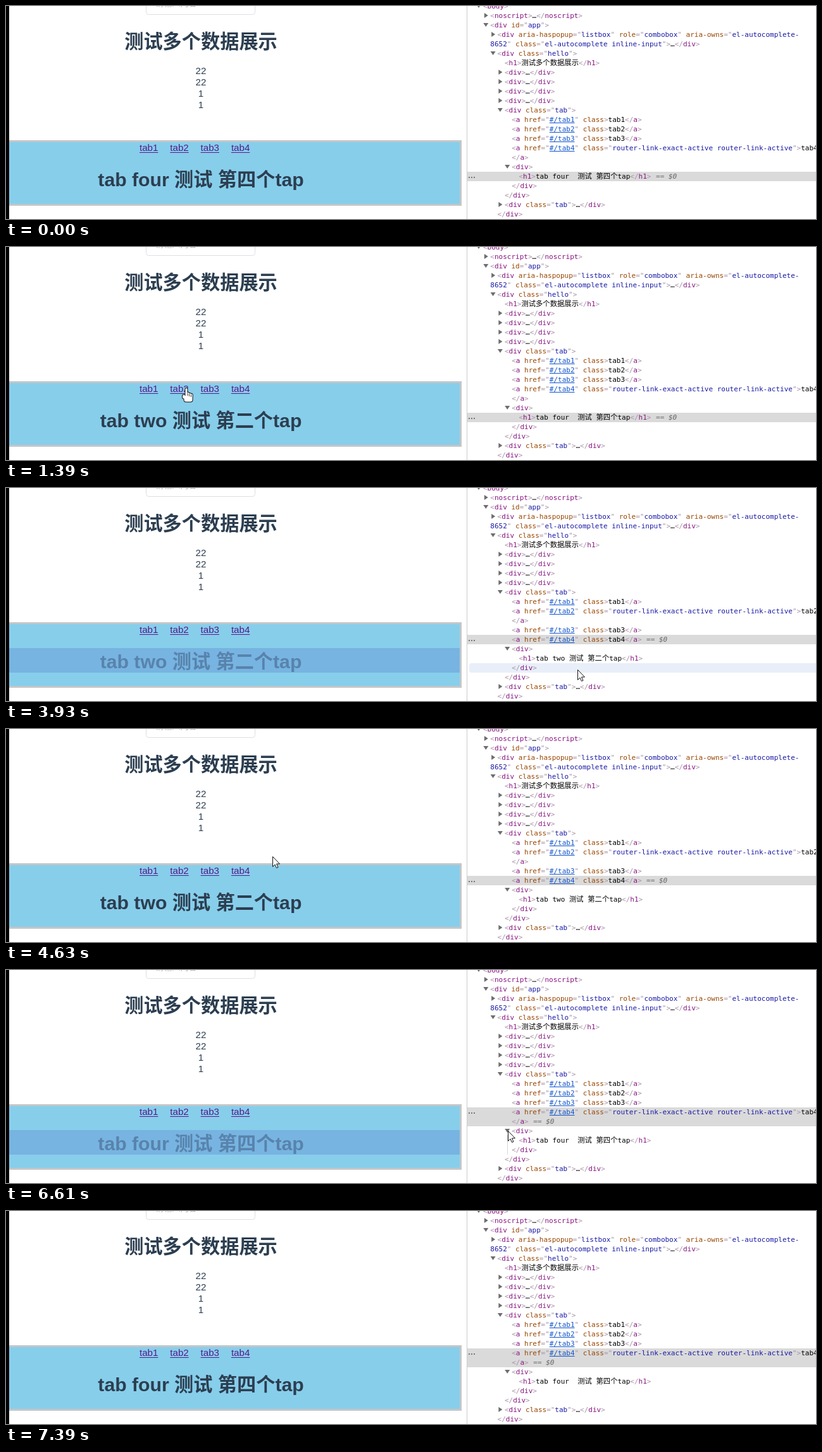
An HTML page with a canvas that plays this animation: 1280 by 338 pixels, repeating every 7.95 s.

```html
<!DOCTYPE html>
<html lang="zh-CN">
<head>
<meta charset="utf-8">
<title>Tab routing demo</title>
<style>
html, body { margin: 0; width: 100%; height: 100%; overflow: hidden; background: #fff; }
canvas { display: block; }
</style>
</head>
<body>
<canvas id="stage" width="1280" height="338"></canvas>
<script>
const ctx = document.getElementById('stage').getContext('2d');
const LOOP = 7950, PANEL = 728, ROW = 15;
const PAGE_TWO = 1390, DOM_TWO = 1460, OPEN_TWO = 3010;
const PAGE_FOUR = 5010, DOM_FOUR = 5040, OPEN_FOUR = 6550;
const POP_IN = 5380, POP_OUT = 5850, FLASH = 950;
const ENTER = 70, LEAVE = 7390;
const SANS = '"Liberation Sans", "Noto Sans CJK SC", sans-serif';
const CJK = '"Noto Sans CJK SC", "Noto Sans CJK", sans-serif';
const MONO = '11px "DejaVu Sans Mono", monospace';
const BODY = '15.1px ' + SANS, TITLE = 'bold 30.2px ' + SANS;
const INK = '#2c3e50', VISITED = '#551a8b', BLUE = 'rgba(111,168,220,.66)', ORANGE = 'rgba(246,178,107,.66)';
const COLORS = {
  punct: [168, 148, 166], name: [136, 18, 128], attr: [153, 69, 0],
  val: [26, 26, 166], link: [17, 85, 204], text: [0, 0, 0], comment: [0, 116, 0]
};

// The pointer rests between eased moves; lift bends a move upwards
const HOME = { x: 812, y: 338 };
const MOVES = [
  { from: ENTER, to: 840, x: 242, y: 233 },
  { from: 910, to: 1220, x: 285, y: 224 },
  { from: 1770, to: 2640, x: 797, y: 252 },
  { from: 3400, to: 3930, x: 903, y: 288 },
  { from: 4000, to: 4780, x: 370, y: 229, lift: 110 },
  { from: 5640, to: 6320, x: 793, y: 255 },
  { from: 7010, to: LEAVE, ...HOME }
];

const clamp = v => Math.max(0, Math.min(1, v));
const smooth = k => k * k * (3 - 2 * k);
const rgb = c => `rgb(${c.map(Math.round).join()})`;
const mix = (a, b, k) => a.map((v, i) => v + (b[i] - v) * k);

function rect(x, y, w, h, color) {
  ctx.fillStyle = color;
  ctx.fillRect(x, y, w, h);
}

function text(s, x, y, font, color, align = 'left') {
  ctx.font = font;
  ctx.fillStyle = color;
  ctx.textAlign = align;
  ctx.fillText(s, x, y);
  return ctx.measureText(s).width;
}

function poly(points, fill, stroke) {
  ctx.beginPath();
  points.forEach(([x, y]) => ctx.lineTo(x, y));
  ctx.closePath();
  if (fill) { ctx.fillStyle = fill; ctx.fill(); }
  if (stroke) { ctx.strokeStyle = stroke; ctx.stroke(); }
}

function pointer(t) {
  if (t < ENTER || t >= LEAVE) return null;
  let { x, y } = HOME;
  for (const m of MOVES) {
    const k = smooth(clamp((t - m.from) / (m.to - m.from)));
    x += (m.x - x) * k;
    y += (m.y - y) * k - (m.lift || 0) * Math.sin(Math.PI * k);
  }
  return { x, y };
}

const linkX = i => 211 + 48.3 * i;

const FOUR = { active: 4, last: 2, title: 'tab four  测试 第四个tap' };
const TWO = { active: 2, last: 4, title: 'tab two 测试 第二个tap' };

function domState(t) {
  if (t < DOM_TWO) return { ...FOUR, open: true, sel: 'inner-h1', since: -LOOP };
  if (t < DOM_FOUR) return { ...TWO, open: t >= OPEN_TWO, sel: 'a4', since: DOM_TWO };
  return { ...FOUR, open: t >= OPEN_FOUR, sel: 'a4', since: DOM_FOUR };
}

// Lines of the element tree; arrow is 'v' for open and '>' for closed
function domLines(s) {
  const lines = [];
  const add = (depth, code, node, arrow, flash, mode) =>
    lines.push({ x: 754 + 11.3 * depth, code, node, arrow, flash, mode });
  add(0, '<body>', '', 'v');
  add(1, '<noscript>…</noscript>', '', '>');
  add(1, '<div id="app">', '', 'v');
  add(2, '<div aria-haspopup="listbox" role="combobox" aria-owns="el-autocomplete-', '', '>');
  add(1, '8652" class="el-autocomplete inline-input">…</div>', '', '', '', 'val');
  add(2, '<div class="hello">', 'hello', 'v');
  add(3, '<h1>测试多个数据展示</h1>', 'h1');
  for (let i = 0; i < 4; i++) add(3, '<div>…</div>', 'data' + i, '>');
  add(3, '<div class="tab">', 'tab', 'v', 'name');
  for (let i = 1; i <= 4; i++) {
    const head = `<a href="#/tab${i}" class`, node = 'a' + i;
    if (i === s.active) {
      add(4, `${head}="router-link-exact-active router-link-active">tab${i}`, node, '', 'val');
      add(4, '</a>', node);
    } else {
      add(4, `${head}>tab${i}</a>`, node, '', i === s.last ? 'attr' : '');
    }
  }
  if (s.open) {
    add(4, '<div>', 'inner', 'v');
    add(5, `<h1>${s.title}</h1>`, 'inner-h1');
    add(4, '</div>', 'inner');
  } else {
    add(4, '<div>…</div>', 'inner', '>', 'name');
  }
  add(3, '</div>', 'tab');
  add(3, '<div class="tab">…</div>', 'next', '>');
  add(2, '</div>', 'hello');
  add(1, '</div>', '');
  add(1, '<!-- built files will be auto injected -->', '');
  return lines;
}

function tokens(code, mode = 'text') {
  const out = [];
  for (const [s] of code.matchAll(/<!--.*|<\/?|>|="|"|[\w#\/-]+|\s+|[^\w\s<>="]+/g)) {
    let kind = mode;
    if (s.startsWith('<!')) kind = 'comment';
    else if (s[0] === '<') { kind = 'punct'; mode = 'name'; }
    else if (s === '>') { kind = 'punct'; mode = 'text'; }
    else if (s === '="') { kind = 'punct'; mode = 'val'; }
    else if (s === '"') { kind = 'punct'; mode = 'attr'; }
    else if (mode === 'name') mode = 'attr';
    else if (mode === 'val' && s[0] === '#') kind = 'link';
    out.push({ s, kind });
  }
  return out;
}

function flashes(rule, tok, i) {
  if (rule === 'name') return i === 1;
  if (rule === 'attr') return tok.s === 'class';
  return rule === 'val' && tok.kind === 'val';
}

function drawLine(line, y, fade) {
  let x = line.x;
  tokens(line.code, line.mode).forEach((tok, i) => {
    const font = /[\u4e00-\u9fff]/.test(tok.s) ? '11.34px ' + CJK : MONO;
    let color = COLORS[tok.kind];
    ctx.font = font;
    const w = ctx.measureText(tok.s).width;
    if (fade < 1 && flashes(line.flash, tok, i)) {
      const ease = 1 - (1 - clamp(fade / 0.8)) ** 1.6;
      ctx.globalAlpha = clamp((1 - fade) * 5);
      rect(x, y - 6, w, 13, rgb(mix([158, 54, 153], [245, 219, 244], ease)));
      ctx.globalAlpha = 1;
      color = mix([255, 255, 255], color, ease ** 4);
    }
    text(tok.s, x, y + 4, font, rgb(color));
    if (tok.kind === 'link') rect(x, y + 5, w, 1, rgb(color));
    x += w;
  });
  return x;
}

function drawArrow(x, y, kind) {
  if (kind === 'v') poly([[x - 4, y - 3], [x + 4, y - 3], [x, y + 3]], '#6e6e6e');
  if (kind === '>') poly([[x - 2.5, y - 4], [x + 3.5, y], [x - 2.5, y + 4]], '#6e6e6e');
}

function drawTree(t, state, lines, hover) {
  rect(PANEL, 0, 552, 338, '#fff');
  rect(PANEL, 0, 1, 338, '#ccc');
  const rebuilt = t >= OPEN_FOUR && t < 7010;
  const fade = clamp((t - state.since) / FLASH);
  const first = lines.findIndex(l => l.node === state.sel);
  lines.forEach((line, i) => {
    const y = i * ROW, top = y - 7;
    const chosen = line.node === state.sel;
    if (chosen) rect(PANEL + 1, top, 551, ROW, '#dadada');
    else if (i === hover && !rebuilt) {
      ctx.fillStyle = '#e8eff9';
      ctx.beginPath();
      ctx.roundRect(732, top, 560, ROW, 4);
      ctx.fill();
    }
    if (i === first) for (let d = 0; d < 3; d++) rect(731 + d * 4, y + 1, 2, 2, '#777');
    drawArrow(line.x - 7, y, line.arrow);
    const end = drawLine(line, y, fade);
    if (chosen && lines[i + 1].node !== state.sel) {
      const w = text(' == ', end + 1, y + 4, MONO, '#777');
      text('$0', end + 1 + w, y + 4, 'italic ' + MONO, '#666');
    }
  });
  if (rebuilt) rect(792, 262, 1, 31, '#d8d8d8');
}

function drawPage(t) {
  rect(0, 0, PANEL, 338, '#fff');
  ctx.strokeStyle = '#dcdfe6';
  ctx.lineWidth = 1;
  ctx.beginPath();
  ctx.roundRect(221.5, -24, 172, 37.5, 4);
  ctx.stroke();
  text('请输入内容', 236, 0, '13.2px ' + CJK, '#b4b8c0');
  text('测试多个数据展示', 308, 67, TITLE, INK, 'center');
  ['22', '22', '1', '1'].forEach((s, i) => text(s, 308, 108 + 18 * i, BODY, INK, 'center'));

  rect(0, 213, 720, 104, '#c3c6c9');
  rect(0, 216, 717, 98, '#87ceeb');
  for (let i = 0; i < 4; i++) {
    const w = text('tab' + (i + 1), linkX(i), 230, BODY, VISITED);
    rect(linkX(i), 232, w, 1, VISITED);
  }
  const { title } = t >= PAGE_TWO && t < PAGE_FOUR ? TWO : FOUR;
  text(title.replace(/ +/g, ' '), 308, 286, TITLE, INK, 'center');
}

function highlight(node) {
  const band = (y, h, color = BLUE, w = 715) => rect(5, y, w, h, color);
  const heading = (y, w) => {
    band(y, 39, BLUE, w);
    band(y - 20, 20, ORANGE, w);
    band(y + 39, 20, ORANGE, w);
  };
  if (node === 'hello') band(36, 302);
  if (node === 'h1') heading(36, 715);
  if (node.startsWith('data')) band(94 + 18 * node[4], 18);
  if (node === 'tab') band(213, 104);
  if (node === 'inner') band(254, 39, BLUE, 712);
  if (node === 'inner-h1') heading(254, 712);
  if (node === 'next') band(317, 21);
  if (/^a\d/.test(node)) rect(linkX(node[1] - 1), 217, 29.5, 18, BLUE);
}

function speaker(x, y) {
  ctx.lineWidth = 1.2;
  poly([[x, y - 2.5], [x + 3, y - 2.5], [x + 7.5, y - 6], [x + 7.5, y + 6], [x + 3, y + 2.5], [x, y + 2.5]], null, '#d0121b');
  [3, 6].forEach(r => {
    ctx.beginPath();
    ctx.arc(x + 8.5, y, r, -0.9, 0.9);
    ctx.stroke();
  });
}

function drawPopup() {
  const small = '12.4px ' + CJK;
  ctx.save();
  ctx.shadowColor = 'rgba(0,0,0,.3)';
  ctx.shadowBlur = 5;
  rect(383, 241, 231, 110, '#fff');
  ctx.restore();
  rect(383, 241, 231, 2, '#c9151e');
  text('tab', 396, 274, 'bold 17.5px "Noto Sans", sans-serif', '#111');
  const star = Array.from({ length: 10 }, (_, i) => {
    const a = i * Math.PI / 5 - Math.PI / 2, r = i % 2 ? 3.6 : 8;
    return [442.5 + r * Math.cos(a), 267.5 + r * Math.sin(a)];
  });
  ctx.lineWidth = 1;
  poly(star, null, '#888');
  text('更多释义»', 545, 271, '12px ' + CJK, '#999');
  ['英', '美'].forEach((s, i) => {
    text(s + ' /tæb/', 396 + 92 * i, 297, small, '#666');
    speaker(453 + 93 * i, 292.5);
  });
  text('n. 标签；制表；帐单', 396, 321, small, '#333');
  text('vt. 给，贴标签', 396, 342, small, '#333');
}

function drawHand() {
  const shape = new Path2D();
  shape.roundRect(-1.5, 0, 3, 16, 1.5);
  for (let i = 0; i < 3; i++) shape.roundRect(1.5 + 2.7 * i, 7 + i, 2.7, 8, 1.3);
  shape.roundRect(-6, 10.5, 4, 6, 2);
  shape.roundRect(-3.5, 12, 13, 9.5, 3);
  ctx.lineWidth = 2;
  ctx.stroke(shape);
  ctx.fill(shape);
  for (let i = 0; i < 3; i++) rect(1.5 + 2.7 * i, 8 + i, 0.8, 4, '#111');
}

function drawPointer({ x, y }) {
  const over = (x - linkX(0)) % 48.3;
  const onLink = over >= 0 && over <= 30 && x < 386 && y >= 217 && y <= 235;
  ctx.save();
  ctx.translate(Math.round(x), Math.round(y));
  ctx.strokeStyle = '#111';
  ctx.fillStyle = '#fff';
  ctx.lineWidth = 1;
  if (onLink) drawHand();
  else poly([[0.5, 0.5], [0.5, 16.5], [4, 13], [6.5, 18.5], [9, 17.5], [6.5, 12], [11.5, 12]], '#fff', '#111');
  ctx.restore();
}

function draw(t) {
  const p = pointer(t), state = domState(t), lines = domLines(state);
  const hover = p && p.x > PANEL ? Math.floor((p.y + 7) / ROW) : -1;
  drawPage(t);
  if (lines[hover]) highlight(lines[hover].node);
  if (t >= POP_IN && t < POP_OUT) drawPopup();
  rect(0, 0, 5, 338, '#000');
  drawTree(t, state, lines, hover);
  if (p) drawPointer(p);
}

const start = performance.now();
function tick() {
  draw((performance.now() - start) % LOOP);
  requestAnimationFrame(tick);
}
tick();
</script>
</body>
</html>
```
